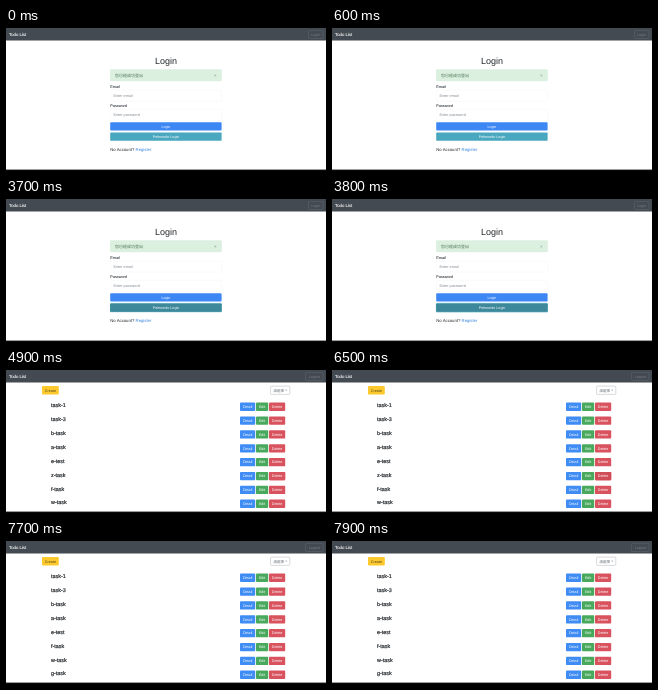
Animation, 320 px wide and 143 px high, one loop 8000 ms. Source, as an HTML page:

```html
<!DOCTYPE html>
<html lang="en">
<head>
<meta charset="utf-8">
<title>Todo List</title>
<style>
html, body { margin: 0; width: 100%; height: 100%; overflow: hidden; background: #fff; }
svg { display: block; width: 100%; height: 100%; }
text { font-family: "Liberation Sans", Arial, "Noto Sans CJK TC", "Noto Sans CJK", sans-serif; text-rendering: geometricPrecision; }
</style>
</head>
<body>
<svg id="stage" viewBox="0 0 320 143"></svg>
<script>
const LOOP = 8000;
const INK = '#24282c';
const stage = document.getElementById('stage');

function add(parent, tag, attrs, content) {
  const el = document.createElementNS('http://www.w3.org/2000/svg', tag);
  for (const key in attrs) el.setAttribute(key, attrs[key]);
  if (content) el.textContent = content;
  return parent.appendChild(el);
}
const group = parent => add(parent, 'g', {});
const box = (parent, x, y, width, height, fill, more) =>
  add(parent, 'rect', { x, y, width, height, fill, rx: 0.9, ...more });
const label = (parent, x, y, size, fill, content, more) =>
  add(parent, 'text', { x, y, 'font-size': size, fill, ...more }, content);

function button(parent, x, y, w, h, fill, content, ink = '#fff', more) {
  box(parent, x, y, w, h, fill, more);
  label(parent, x + w / 2, y + h / 2 + 1.3, 3.7, ink, content, { 'text-anchor': 'middle' });
}

// Steps are [time, opacity]; each value holds until the next step.
function track(el, steps, easing = 'steps(1, end)') {
  const frames = steps.map(([t, opacity]) => ({ offset: t / LOOP, opacity, easing }));
  frames.push({ offset: 1, opacity: steps[steps.length - 1][1] });
  el.animate(frames, { duration: LOOP, iterations: Infinity });
}

function navButton(parent, x, content) {
  button(parent, x, 2.3, 317 - x, 8.2, 'none', content, '#767d85', { stroke: '#6b727a', 'stroke-width': 0.4 });
}

function field(parent, y, name, hint) {
  label(parent, 104.3, y, 3.8, '#343a40', name, { stroke: '#343a40', 'stroke-width': 0.07 });
  box(parent, 104.2, y + 2.1, 111.4, 11, '#fff', { stroke: '#eceff1', 'stroke-width': 0.3 });
  label(parent, 107.4, y + 8.9, 3.8, '#858d95', hint);
}

function drawLogin() {
  const page = group(stage);
  navButton(page, 302.5, 'Login');
  label(page, 160, 36.4, 9, INK, 'Login', { 'text-anchor': 'middle' });
  box(page, 104.2, 41.6, 111.4, 11.3, '#dcf0e0', { stroke: '#cfe8d5', 'stroke-width': 0.3 });
  label(page, 109, 48.8, 4, '#48714f', '您已經成功登出');
  label(page, 209.3, 48.6, 4.6, '#7d9784', '×', { 'text-anchor': 'middle' });
  field(page, 60, 'Email', 'Enter email');
  field(page, 79.2, 'Password', 'Enter password');
  button(page, 104.2, 94.2, 111.4, 8.2, '#3d87f5', 'Login');

  const ring = box(page, 103.8, 103.8, 112.2, 9.9, '#b4dbe3', { rx: 1.2 });
  box(page, 104.2, 104.4, 111.4, 8.4, '#49a8bf');
  const hover = box(page, 104.2, 104.4, 111.4, 8.4, '#3d889a');
  label(page, 160, 109.9, 3.7, '#fff', 'Pelmondo Login', { 'text-anchor': 'middle' });

  const foot = label(page, 104.3, 122.8, 4.25, INK, 'No Account? ');
  add(foot, 'tspan', { fill: '#3582dc' }, 'Register');

  track(hover, [[0, 0], [1700, 1]]);
  track(ring, [[0, 0], [3700, 0.5], [3800, 1]]);
  track(page, [[0, 1], [4900, 0]]);
}

function drawRow(parent, name, i) {
  const y = 32.6 + i * 13.86;
  label(parent, 45, y + 4.8, 5.4, INK, name, { stroke: INK, 'stroke-width': 0.2 });
  button(parent, 234, y, 15.2, 8.3, '#3f8cf5', 'Detail');
  button(parent, 250, y, 12.2, 8.3, '#48a95d', 'Edit');
  button(parent, 263, y, 16.2, 8.3, '#d9535f', 'Delete');
}

function drawList(parent, names) {
  const list = group(parent);
  names.forEach((name, i) => drawRow(list, name, i));
  return list;
}

function drawTasks() {
  const page = group(stage);
  navButton(page, 299.6, 'Logout');
  button(page, 36, 16, 16.8, 8.4, '#fdc92c', 'Create', '#4a4022');
  box(page, 264.6, 16.1, 19.2, 8.3, '#fff', { stroke: '#a0a5aa', 'stroke-width': 0.4 });
  label(page, 267.4, 21.6, 3.5, '#6c757d', '請選擇');
  add(page, 'path', { d: 'M279.3 19.8h1.8l-.9 1z', fill: '#6c757d' });

  const names = ['task-1', 'task-3', 'b-task', 'a-task', 'e-test', 'z-task', 'f-task', 'w-task', 'g-task'];
  const before = drawList(page, names.slice(0, 8));
  const after = drawList(page, names.filter(name => name !== 'z-task'));

  const y = 32.6 + 5 * 13.86;
  const ring = box(before, 262.5, y - 0.5, 17.2, 9.3, '#efb7bc', { rx: 1.2 });
  const hover = group(before);
  box(before, 263, y, 16.2, 8.3, '#d9535f');
  before.appendChild(hover);
  button(before, 263, y, 16.2, 8.3, 'none', 'Delete');
  box(hover, 263, y, 16.2, 8.3, '#bf404c');

  track(hover, [[0, 0], [6500, 0.35], [6600, 0.75], [6700, 1]]);
  track(ring, [[0, 0], [7600, 1]]);
  track(before, [[0, 1], [7700, 0]]);
  track(after, [[0, 0], [7700, 1]]);
  track(page, [[0, 0], [4900, 1]]);
}

box(stage, 0, 0, 320, 143, '#fff', { rx: 0 });
box(stage, 0, 0, 320, 12.5, '#444a51', { rx: 0 });
label(stage, 3, 7.9, 4.3, '#f4f5f6', 'Todo List', { stroke: '#f4f5f6', 'stroke-width': 0.12 });
drawLogin();
drawTasks();
box(stage, 0, 141.6, 320, 1.4, '#08090a', { rx: 0 });
</script>
</body>
</html>
```
